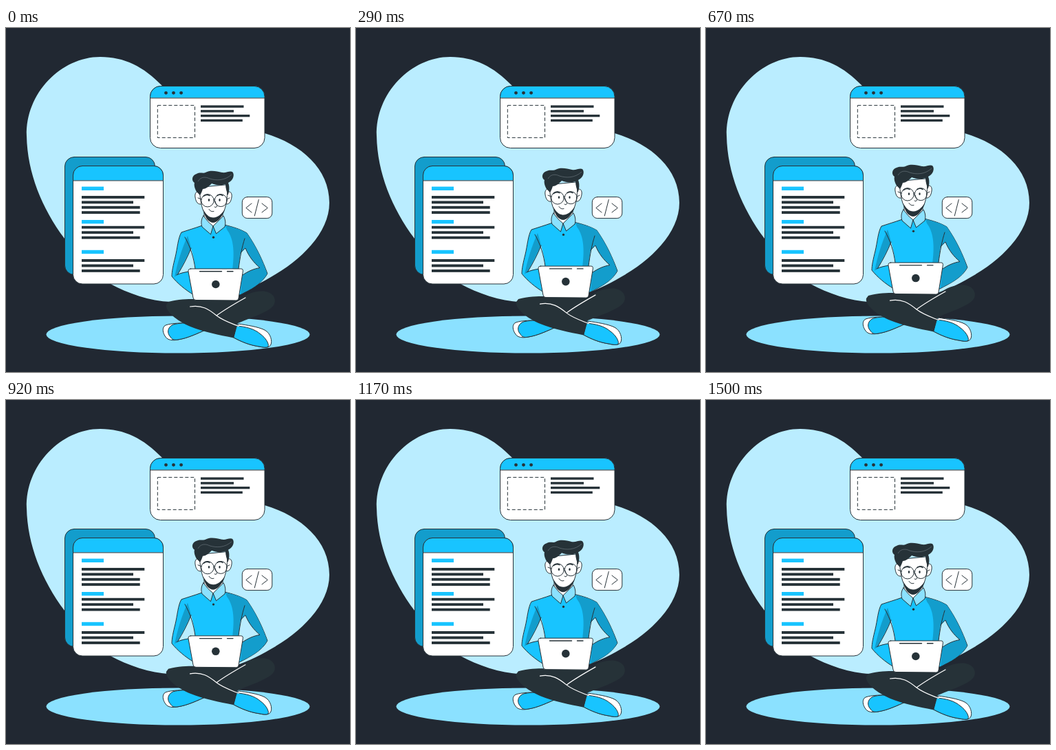
These frames come from a looping animation (500x500 px, 1540 ms). An HTML page:

```html
<!DOCTYPE html>
<html lang="en">
<head>
<meta charset="utf-8">
<title>Developer at work</title>
<style>
html, body { margin: 0; width: 100%; height: 100%; overflow: hidden; background: #212832; }
svg { display: block; width: 100vw; height: 100vh; }
.ln { stroke: #263238; stroke-width: 1; stroke-linecap: round; stroke-linejoin: round; }
.no { fill: none; }
.b { fill: #18c4ff; }
.d { fill: #139dcc; }
.l { fill: #8be1ff; }
.p { fill: #baedff; }
.w { fill: #fff; }
.k { fill: #263238; }
.wl { fill: none; stroke: #fff; stroke-width: 1.2; stroke-linecap: round; }
</style>
</head>
<body>
<svg viewBox="0 0 500 500">
  <rect width="500" height="500" fill="#212832"/>
  <path class="p" d="M137 42C80 42 28 95 30 157C31 210 52 262 85 306C104 338 128 359 150 371C178 386 208 397 240 398C300 400 343 387 385 362C428 338 470 298 470 254C470 205 430 169 376 153C310 132 260 117 227 84C200 56 172 42 137 42Z"/>
  <ellipse class="l" cx="250" cy="445.5" rx="191.500" ry="27"/>

  <g id="browser">
    <rect class="w ln" x="209.500" y="84.500" width="166.500" height="90" rx="15"/>
    <path class="b ln" d="M209.500 101.500V99.500A15 15 0 0 1 224.500 84.500H361A15 15 0 0 1 376 99.500V101.500Z"/>
    <circle class="k" cx="232.500" cy="94.300" r="2.400"/>
    <circle class="k" cx="243.500" cy="94.300" r="2.400"/>
    <circle class="k" cx="254.600" cy="94.300" r="2.400"/>
    <rect class="no ln" x="220.300" y="112.400" width="54.200" height="47" stroke-dasharray="5 3" style="stroke-linecap:butt"/>
  </g>

  <g id="page">
    <rect class="d ln" x="85.500" y="187.500" width="131" height="171" rx="13.500"/>
    <rect class="w ln" x="97.500" y="200.500" width="131" height="171.500" rx="13.500"/>
    <path class="b ln" d="M97.500 221.500V214A13.500 13.500 0 0 1 111 200.500H215A13.500 13.500 0 0 1 228.500 214V221.500Z"/>
  </g>
  <g id="bars"></g>

  <g id="badge" class="ln">
    <rect class="w" x="343.300" y="245.600" width="43.500" height="31" rx="7.500"/>
    <path class="no" d="M357 255L348.800 261.500L357 268M367.300 249.500L361.300 273M372 255L380.300 261.500L372 268"/>
  </g>

  <g id="man">
    <!-- shoes -->
    <path class="w ln" d="M270 430C258 428 240 429 232 432C226 435 228 444 232 449C235 454 243 454.500 250 453C264 451 278 444 292 438Z"/>
    <path class="b ln" d="M272 430C262 428 251 429 243 431C234 435 234 444 239 449C241 453 245 454 250 453C264 451 278 444 292 438Z"/>
    <path class="w ln" d="M338 430C350 432 366 434 376 439C385 444 387 455 385 460C383 465 376 465 368 463C354 461 342 456 331 450Z"/>
    <path class="b ln" d="M335 433C348 434 361 437 370 445C377 450 383 459 381 463.500C378 465 373 464 368 463C354 461 342 456 331 450Z"/>

    <!-- legs -->
    <path class="k" d="M236 398C250 394 264 394 274 394L339 395C350 386 362 382 375 382.500C388 384 393 393 390 401C386 411 362 419 337 429L331 450.500C310 446 287 442 268 434C247 425 231 411 233 402Z"/>
    <path class="wl" d="M267.500 405C285 402 295 409 306 418C315 425 327 429 338 433.500M306 418C318 409 332 401 348 392"/>

    <!-- sweater -->
    <path class="b ln" d="M284 287.500C274 291 264 294 255 297C250 305 249 321 246 333C243 345 241 354 241 361C249 371 261 381 273 388L340 388C355 380 372 372 380 357C373 338 364 318 350 298C340 292 329 289 319 286.500Z"/>
    <path class="d" d="M264 302C255 322 249 342 245 362L250 357.500L269 320L267 312Z"/>
    <path class="d" d="M319 287C329 289.500 340 292 350 298C364 318 373 338 379.500 357C372 372 355 380 341 387L344 352H329C332 329 332 307 321 293Z"/>
    <path class="p" d="M269 320C272 330 274 340 275 351L266 354C260 354.500 255 355.500 250 357.500C257 346 264 333 269 320Z"/>
    <path class="p" d="M341 327L348 320C353 332 360 341 369 348.500C360 350 352 353.500 344 359L338 350Z"/>
    <path class="no ln" d="M260 304C268 318 273 334 275 350M269 320C264 333 257 346 250 357.500M248 359C254 356 260 355 266 354M347 306C343 318 340 334 338 350M341 327C343 324 346 322 348 320C353 332 360 341 369 348.500C360 350 352 353.500 344 359"/>

    <!-- neck and collar -->
    <path class="w ln" d="M288 266V279L301 289L315 278V264Z"/>
    <path class="l ln" d="M287 273C284 277 283 283 285 289L297.500 300L301 288L305.500 299L318 289C319.500 284 319 278 316 273L301 288Q294 283 287 273Z"/>
    <circle class="k" cx="301.500" cy="304.300" r="1.700"/>

    <!-- head -->
    <path class="w ln" d="M282 239C277 236 274 240 275 246C276 253 279 257 284 256ZM321 239C326 236 329 240 328 246C327 253 324 257 319 256Z"/>
    <path class="w ln" d="M281 232C282 248 284 262 289 270C293 277 297 280 301 280C307 280 314 274 317 266C321 255 322 243 322 228Z"/>
    <path class="k" d="M287 264C291 272 296 276 302 275.500C308 275 313 271 317.500 264C315 274 308 282.500 301 283C294 282 289 276 287 264Z"/>
    <path class="k" d="M282 243L277 238C274 233 273 228 274 225C269 222 270 214 277 212C282 209 287 212 290 210C297 206 306 208 314 210C320 211 325 207 329 209C333 213 330 222 323 225C325 230 325 237 322.500 243C321 238 319 233 319 227C313 229 306 229 299 226C296 229 291 234 286 234C285 237 284 240 282 243Z"/>
    <path class="no" stroke="#68737a" stroke-width=".7" d="M279 223C283 216 290 216 296 219C306 222 318 222 328 213"/>
    <g class="no ln">
      <circle cx="293" cy="250.800" r="9.200"/>
      <circle cx="312.300" cy="250.600" r="9"/>
      <path d="M301.500 249Q302.500 247.500 303.500 249M284 249L279 247M321 249L325 247M304 252C305 256 308 258 306 260Q304 261.500 303 260M295 263.500Q298 268 302 266.500"/>
      <path stroke-width="1.600" d="M287 244.500Q291 241 296 243.500M307 243.500Q311 241 315 243.500"/>
    </g>
    <ellipse class="k" cx="295" cy="250" rx="1.200" ry="1.900"/>
    <ellipse class="k" cx="310.500" cy="250" rx="1.200" ry="1.900"/>

    <!-- laptop -->
    <path class="w ln" d="M268.500 350H341.500Q345 350 344.300 354L338 393Q337.500 396 334.500 396L276 395.500Q272.500 395.500 272 392L265 354Q264.500 350 268.500 350Z"/>
    <path class="no ln" style="stroke-width:1.400" d="M281.500 353.800H313.500M321.500 353.800H330"/>
    <circle class="k" cx="304.800" cy="372.500" r="5.800"/>
  </g>
</svg>
<script>
const NS = "http://www.w3.org/2000/svg";
const bars = document.getElementById("bars");
const man = document.getElementById("man");

function bar(x, y, w, h, cls) {
  const r = document.createElementNS(NS, "rect");
  Object.entries({ x, y, width: w, height: h, class: cls })
    .forEach(([k, v]) => r.setAttribute(k, v));
  bars.append(r);
}

// stacked text lines of the given widths
function lines(x, y, step, h, widths) {
  widths.forEach((w, i) => bar(x, y + i * step, w, h, "k"));
}

lines(283, 112.4, 6.75, 3.4, [62.5, 48, 71.3, 60.8]);
[230.6, 279, 322.8].forEach(y => bar(110, y, 32, 5.4, "b"));
lines(110, 244, 7.4, 3.9, [91.3, 75, 84.7, 84.7]);
lines(110, 287.8, 7.5, 3.8, [91.3, 75, 84.7]);
lines(110, 336, 7.5, 3.9, [91.3, 75, 84.7]);

const LOOP = 1540, PERIOD = 1500, PHASE = 20, RISE = 10;

// linear rise and fall
function lift(t) {
  const p = ((t + PHASE) % PERIOD) / PERIOD;
  return RISE * (1 - Math.abs(1 - 2 * p));
}
const rest = lift(0);

function draw(t) {
  man.setAttribute("transform", `translate(0 ${(rest - lift(t)).toFixed(3)})`);
}

const start = performance.now();
function tick() {
  draw((performance.now() - start) % LOOP);
  requestAnimationFrame(tick);
}
draw(0);
requestAnimationFrame(tick);
</script>
</body>
</html>
```
